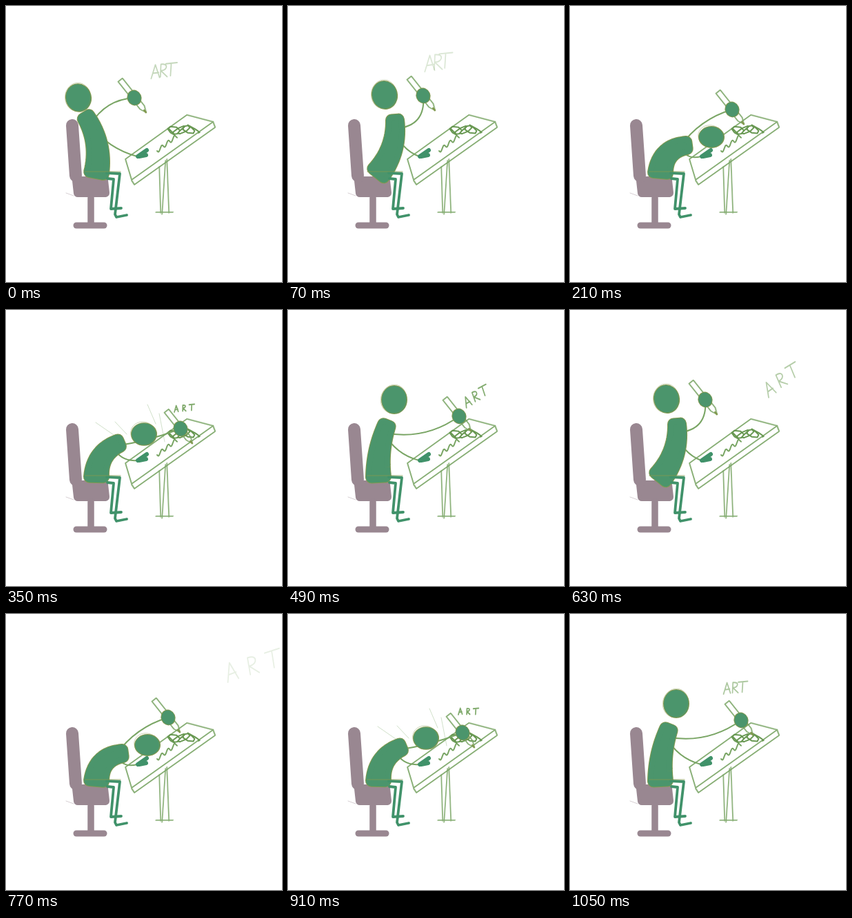
Animation of 400 by 400 pixels, one loop 1120 ms. Source, as an HTML page with a canvas:

```html
<!DOCTYPE html>
<html lang="en">
<head>
<meta charset="utf-8">
<title>Art at the desk</title>
<style>
html, body { margin: 0; width: 100%; height: 100%; overflow: hidden; background: #fff; }
canvas { display: block; }
</style>
</head>
<body>
<canvas id="stage" width="400" height="400"></canvas>
<script>
const ctx = document.getElementById('stage').getContext('2d');
const STEP = 70, STEPS = 16, BEAT = 8;
const GREEN = '#4b956c', LIMB = '#40926a', OLIVE = '#83994f', DESK = '#79a564', CHAIR = '#998791';
const HIP = [131, 242], REST = [190, 218];
ctx.lineCap = ctx.lineJoin = 'round';

// Key poses of one beat; curl bends the spine and bow the drawing arm.
const back = { at: 0, head: [105, 133], chest: [116, 161], hand: [186, 133], curl: 16, bow: -20 };
const keys = [
  back,
  { at: 1, head: [140, 129], chest: [155, 165], hand: [196, 130], curl: 16, bow: 32 },
  { at: 3, head: [205, 190], chest: [169, 202], hand: [235, 150], curl: -22, bow: -16 },
  { at: 5, head: [200, 180], chest: [164, 193], hand: [253, 172], curl: -19, bow: 6 },
  { at: 7, head: [154, 130], chest: [143, 167], hand: [248, 154], curl: -8, bow: 24 },
  { ...back, at: BEAT }
];

const lerp = (a, b, k) => a + (b - a) * k;
const mix = (a, b, k) => a.map((v, i) => lerp(v, b[i], k));

function poseAt(beat) {
  const next = keys.findIndex(key => key.at > beat), a = keys[next - 1], b = keys[next];
  const k = (beat - a.at) / (b.at - a.at);
  const pose = {};
  for (const part of ['head', 'chest', 'hand']) pose[part] = mix(a[part], b[part], k);
  for (const part of ['curl', 'bow']) pose[part] = lerp(a[part], b[part], k);
  return pose;
}

// Control point that bends the line from a to b sideways.
function bend(a, b, amount) {
  const dx = b[0] - a[0], dy = b[1] - a[1], k = amount / Math.hypot(dx, dy);
  return [(a[0] + b[0]) / 2 - dy * k, (a[1] + b[1]) / 2 + dx * k];
}

const along = (a, c, b, t) => mix(mix(a, c, t), mix(c, b, t), t);
const arc = (a, b, amount) => `M${a}Q${bend(a, b, amount)} ${b}`;

function oval(x, y, rx, ry, tilt = 0) {
  const path = new Path2D();
  path.ellipse(x, y, rx, ry, tilt, 0, 7);
  return path;
}

function line(d, color, width = 2, alpha = 1) {
  ctx.globalAlpha = alpha;
  ctx.strokeStyle = color;
  ctx.lineWidth = width;
  ctx.stroke(new Path2D(d));
  ctx.globalAlpha = 1;
}

// Two loose passes, like a quick pencil outline.
function sketch(d, width = 1.8) {
  line(d, DESK, width, .85);
  ctx.save();
  ctx.translate(.8, -.8);
  line(d, DESK, 1, .45);
  ctx.restore();
}

// Filled shape with rounded corners and a thin olive edge.
function blob(path, round = 0) {
  line(path, OLIVE, 2 * round + 2);
  if (round) line(path, GREEN, 2 * round);
  ctx.fillStyle = GREEN;
  ctx.fill(path);
}

function drawChair() {
  line('M96 173L101 246', CHAIR, 18);
  line('M102 253H142L144 271H104Z', CHAIR, 12);
  line('M108 262H138', CHAIR, 16);
  line('M123 278V317', CHAIR, 9.5);
  line('M102 318H142', CHAIR, 9);
  line('M87 271L98 275', CHAIR, 1, .4);
}

function drawDesk() {
  sketch('M173 222L262 158L300 168L182 252ZM182 253L186 259L303 176L300 168');
  sketch('M222 233L224 300M231 224L226 302M233 222L236 300M217 299L242 299', 1.4);

  let wave = 'M219 210', scrawl = 'M236 178';
  for (let i = 1; i <= 30; i++) {
    const t = i / 30;
    wave += `L${lerp(219, 248, t)} ${lerp(210, 188, t) + 3 * Math.sin(t * 20)}`;
    scrawl += `L${lerp(236, 275, t) + 7 * Math.sin(t * 34)} ${181 - 3 * t + 6 * Math.sin(t * 27)}`;
  }
  line(wave, DESK, 2);
  line(scrawl, '#689852', 2);
}

function drawBody(chest, curl) {
  const round = 8, spine = bend(HIP, chest, curl), left = [], right = [];
  for (let t = 0; t <= 1; t += 1 / 16) {
    const [x, y] = along(HIP, spine, chest, t);
    const [dx, dy] = mix([spine[0] - HIP[0], spine[1] - HIP[1]], [chest[0] - spine[0], chest[1] - spine[1]], t);
    const w = (lerp(18, 13, t) - round) / Math.hypot(dx, dy);
    left.push([x + dy * w, y - dx * w]);
    right.unshift([x - dy * w, y + dx * w]);
  }
  blob(new Path2D('M' + [...left, ...right].join('L') + 'Z'), round);
}

function drawLegs() {
  line('M146 242L165 243L158 302L160 306L175 303', LIMB, 3.8);
  line('M147 250L156 251L152 294L167 293', LIMB, 3.8);
  line('M115 240H166', OLIVE, 1.2, .8);
}

function drawPencil([x, y]) {
  ctx.save();
  ctx.translate(x, y);
  ctx.rotate(.9);
  sketch('M-33 -4L18 -4L27 0L18 4L-33 4Z', 1.6);
  line('M23 0H27', OLIVE, 2.5);
  ctx.restore();
}

function drawFigure({ head, chest, hand, curl, bow }) {
  const shoulder = along(HIP, bend(HIP, chest, curl), chest, .85);
  line(arc(shoulder, hand, bow), DESK, 2);
  line(arc(shoulder, REST, 14), DESK, 2);
  line('M191 218L204 209M193 218L203 216', LIMB, 6);
  drawBody(chest, curl);
  drawLegs();
  drawPencil(hand);
  blob(oval(...hand, 9.5, 10.5, -.4));

  const [x, y] = head, low = Math.max(0, y - 130) / 60;
  const tilt = -.015 * Math.max(0, curl);
  blob(oval(x, y, 18, 20 - 5 * low, tilt));
  line(oval(x - 1, y - 1, 18.5, 21 - 5 * low, tilt + .3), OLIVE, .8, .5);
}

function drawImpact() {
  line('M205 137L217 165M130 163L156 181M158 162L175 180M222 150L230 191', DESK, 1, .35);
}

const letters = [
  'M-.4 .55L-.05 -.5L.34 .45M-.25 .15L.25 .08',
  'M-.25 .5L-.22 -.45Q.35 -.5 .25 -.2Q.15 .02 -.22 .03L.35 .48',
  'M-.45 -.4L.55 -.5M.03 -.44L-.02 .5'
].map(d => new Path2D(d));

function drawWord({ x, y, rise, tilt, height, pitch, alpha }) {
  letters.forEach((letter, i) => {
    const offset = (i - 1) * pitch;
    ctx.save();
    ctx.translate(x + offset * Math.cos(rise), y + offset * Math.sin(rise));
    ctx.rotate(tilt);
    ctx.scale(height * .85, height);
    line(letter, DESK, 2 / height, alpha);
    ctx.restore();
  });
}

// One word swings away to the right and spreads out.
function flyRight(u) {
  if (u < 0 || u > 1) return;
  const spread = u ** 1.8, swing = Math.sin(Math.PI * u);
  drawWord({
    x: 258 + 99 * spread, y: 142 - 68 * u ** 1.25,
    rise: -.1 - .2 * u - .5 * swing, tilt: -.2 * u - .35 * swing,
    height: 9 + 17 * u, pitch: 11 + 20 * spread, alpha: Math.min(.95, 1.3 - 1.12 * u)
  });
}

// The other drifts up to the left and fades.
function floatUp(u) {
  if (u < 0 || u > 1) return;
  drawWord({
    x: 261 - 55 * u, y: 141 - 72 * u ** .8,
    rise: -.25 * u, tilt: .02,
    height: 9 + 17 * u, pitch: 11, alpha: .95 - .85 * u
  });
}

function draw() {
  const step = Math.floor(performance.now() / STEP) % STEPS, beat = step % BEAT;
  ctx.fillStyle = '#fff';
  ctx.fillRect(0, 0, 400, 400);
  drawChair();
  drawDesk();
  drawFigure(poseAt(beat));
  if (beat === 5) drawImpact();
  flyRight((step - 5) / 6);
  floatUp((step + 3) % STEPS / 5);
  requestAnimationFrame(draw);
}
draw();
</script>
</body>
</html>
```
